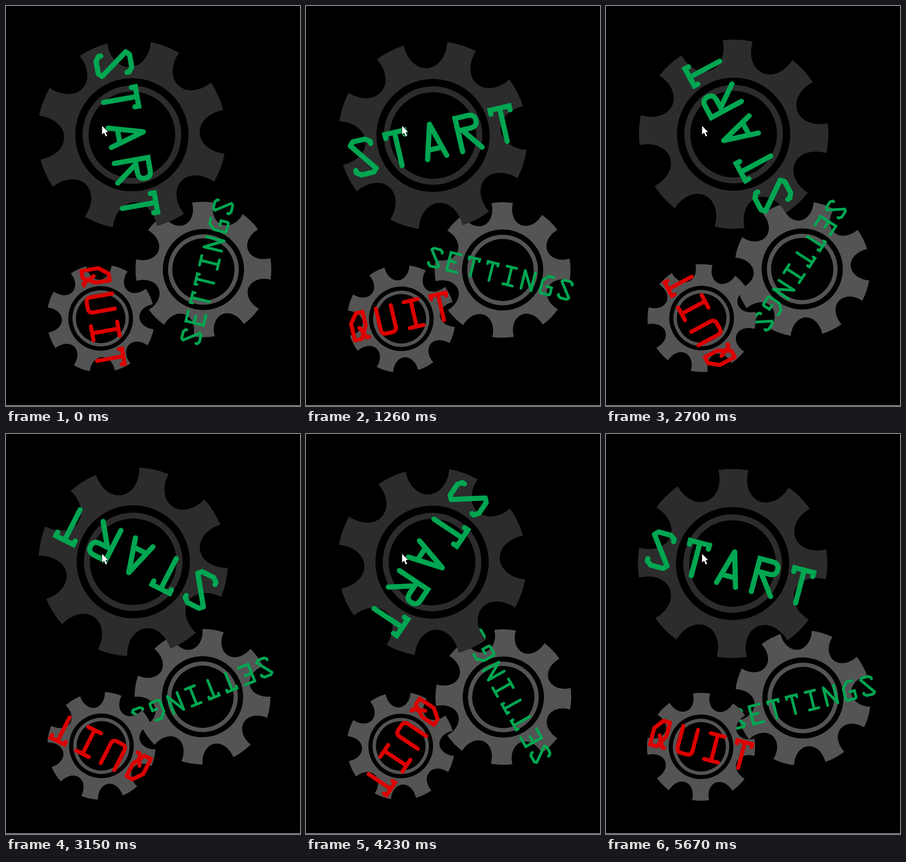
Recreate the animation shown at these times as an HTML page. Size 641x874 px, loop 5.77 s.

```html
<!DOCTYPE html>
<html lang="en">
<head>
<meta charset="utf-8">
<title>Gear menu</title>
<style>
  html, body { margin: 0; width: 100%; height: 100%; overflow: hidden; background: #000; }
  svg { display: block; }
</style>
</head>
<body>
<svg id="stage" width="641" height="874" viewBox="0 0 641 874"></svg>
<script>
const STEP = 90, LOOP = 5770, LAST = 63;
const RADIUS = 206.5, TEETH = 8, HALF_TOOTH = 9.1, TOOTH_SHIFT = -14.2, PITCH = 78.4;

// Single-stroke letters around their own centre, 85 units tall with the stroke.
const glyphs = {
  S: 'M22.5-25V-30L13-37.2H-15L-22-30 22 30 15 37.2H-13L-22.5 30V25',
  T: 'M-21.4-28.5V-37.2H21.4V-28.5M0-37.2V37.2',
  A: 'M-21.4 37.2L0-37.2 21.4 37.2M-15.7 17.5H15.7',
  R: 'M-21.4 37.2V-37.2H6Q22-37.2 22-24V-22Q22-9 6-9H-21.4M-12-9L22 37.2',
  E: 'M21.4-37.2H-21.4V37.2H21.4M-21.4-2H7',
  I: 'M-20-37.2H20M0-37.2V37.2M-20 37.2H20',
  N: 'M-21.4 37.2V-37.2L21.4 37.2V-37.2',
  G: 'M21-37.2H-2L-21.4-14V30Q-21.4 37.2-14 37.2H14Q21.4 37.2 21.4 30V5H2',
  Q: 'M0-37.2H19V2L0 36.5H-20V-11ZM0 5L15 36H21',
  U: 'M-21.4-37.2V24Q-21.4 37.2-8 37.2H8Q21.4 37.2 21.4 24V-37.2'
};

// Step numbers and the angles reached there; the gears mesh, so they turn opposite ways.
const keys = [0, 14, 23, 30, 40, 53, 63];
const leftTurn = [79.9, -13, -71.7, -118.3, -187.8, -277.6, -345.3];
const rightTurn = [-76.3, 13.8, 75.2, 123, 193.4, 281.2, 345.8];

const gears = [
  { word: 'SETTINGS', x: 429, y: 575.4, size: .717, fill: '#545454', ink: '#00a651',
    textX: -2.8, textY: 10.7, textSize: .532, turn: rightTurn },
  { word: 'START', x: 276.5, y: 281, size: 1, fill: '#2c2c2c', ink: '#00a651',
    textX: -2, textY: 13.6, textSize: 1, turn: leftTurn },
  { word: 'QUIT', x: 207.5, y: 682.4, size: .571, fill: '#545454', ink: '#dc0000',
    textX: -1.8, textY: -4, textSize: .78, turn: leftTurn }
];

function rim(degrees) {
  const a = degrees * Math.PI / 180;
  return `${RADIUS * Math.cos(a)} ${RADIUS * Math.sin(a)}`;
}

function gearPath() {
  let d = '';
  for (let i = 0; i < TEETH; i++) {
    const mid = TOOTH_SHIFT + i * 360 / TEETH;
    const gap = mid + 180 / TEETH;
    d += `${i ? 'L' : 'M'}${rim(mid - HALF_TOOTH)}`
      + `A${RADIUS} ${RADIUS} 0 0 1 ${rim(mid + HALF_TOOTH)}`
      + `A64.3 48.6 ${gap} 0 0 ${rim(mid + 360 / TEETH - HALF_TOOTH)}`;
  }
  return d + 'ZM123.5 0A123.5 123.5 0 1 0-123.5 0A123.5 123.5 0 1 0 123.5 0Z';
}

function wordMarkup(word) {
  return [...word].map((letter, i) => {
    const x = (i - (word.length - 1) / 2) * PITCH;
    const join = 'TER'.includes(letter) ? 'miter' : 'round';
    return `<path transform="translate(${x})" stroke-linejoin="${join}" d="${glyphs[letter]}"/>`;
  }).join('');
}

const body = gearPath();
const stage = document.getElementById('stage');
stage.innerHTML = gears.map(g => `
  <g class="gear" role="img" aria-label="${g.word}">
    <g transform="scale(${g.size}) translate(0 2)">
      <path d="${body}" fill="${g.fill}" fill-rule="evenodd"/>
      <circle r="101" fill="none" stroke="${g.fill}" stroke-width="13"/>
    </g>
    <g transform="translate(${g.textX} ${g.textY}) scale(${g.textSize})" fill="none"
       stroke="${g.ink}" stroke-width="11.3" stroke-linecap="round">${wordMarkup(g.word)}</g>
  </g>`).join('') + `
  <path d="M209 261v20.5l4.6-4 3.6 8 4-1.8-3.6-7.4 5.6-.8z" fill="#fff" stroke="#000"/>
  <path d="M0 873.5H641" stroke="#fff"/>`;
const nodes = stage.querySelectorAll('.gear');

function angleAt(step, turn) {
  const i = Math.max(1, keys.findIndex(k => k >= step));
  const part = (step - keys[i - 1]) / (keys[i] - keys[i - 1]);
  return turn[i - 1] + (turn[i] - turn[i - 1]) * part;
}

function draw() {
  const step = Math.min(LAST, Math.floor(performance.now() % LOOP / STEP));
  gears.forEach((g, i) => nodes[i].setAttribute('transform',
    `translate(${g.x} ${g.y}) rotate(${angleAt(step, g.turn)})`));
  requestAnimationFrame(draw);
}
draw();
</script>
</body>
</html>
```
